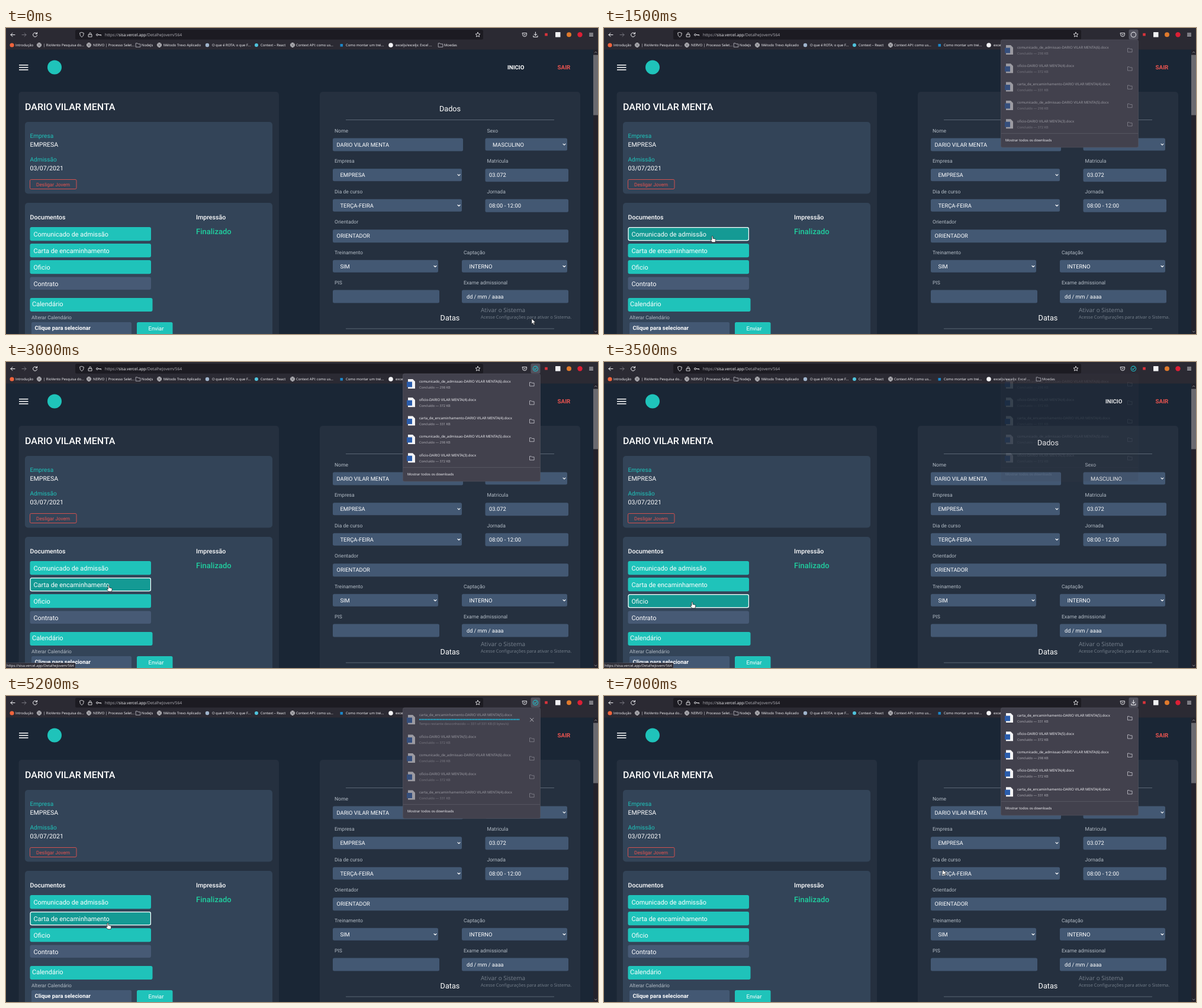
An HTML page that plays this animation: 1000 by 518 pixels, repeating every 7.1 s.

```html
<!DOCTYPE html>
<html lang="pt-BR">
<head>
<meta charset="utf-8">
<title>Detalhe do jovem</title>
<style>
html, body { margin: 0; width: 100%; height: 100%; overflow: hidden; background: #1a2635; }
svg { display: block; width: 100%; height: 100%; text-rendering: geometricPrecision; }
text { font-family: Roboto, sans-serif; white-space: pre; }
.ui { font-family: "Open Sans", "Noto Sans", sans-serif; }
</style>
</head>
<body>
<svg id="stage" viewBox="0 0 1000 518" preserveAspectRatio="none"></svg>
<script>
const LOOP = 7100, STEP = 100;
const PERSON = 'DARIO VILAR MENTA';
const URL_HOST = 'sisa.vercel.app', URL_PATH = '/DetalheJovem/564';
const TEAL = '#1fc3ba', FIELD = '#435873', INNER = '#334458', CARD = '#25303f', RED = '#e5534f';
const CHROME = '#2b2a33', LIGHT = '#fbfbfe';

const rect = (x, y, w, h, fill, r = 0, extra = '') =>
  `<rect x="${x}" y="${y}" width="${w}" height="${h}" rx="${r}" fill="${fill}" ${extra}/>`;
const text = (x, y, str, size, fill = '#fff', extra = '') =>
  `<text x="${x}" y="${y}" font-size="${size}" fill="${fill}" ${extra}>${str}</text>`;
const ui = (x, y, str, size, fill = LIGHT, extra = '') => text(x, y, str, size, fill, 'class="ui" ' + extra);
const dot = (x, y, r, fill) => `<circle cx="${x}" cy="${y}" r="${r}" fill="${fill}"/>`;
const line = (d, color = LIGHT, w = 1, extra = '') =>
  `<path d="${d}" fill="none" stroke="${color}" stroke-width="${w}" stroke-linecap="round" stroke-linejoin="round" ${extra}/>`;
const group = (id, body, extra = '') => `<g id="${id}" ${extra}>${body}</g>`;
const MEDIUM = 'font-weight="500"', BOLD = 'font-weight="700"', MIDDLE = 'text-anchor="middle"';

const folder = (x, y) =>
  line(`M${x - 3.8} ${y + 3}v-6h2.8l1 1.2h3.8v4.8z`, '#dcdce2', 0.7);
const globe = (x, y) =>
  line(`M${x - 3.5} ${y}a3.5 3.5 0 1 0 7 0a3.5 3.5 0 1 0 -7 0h7M${x} ${y - 3.5}q-3 3.5 0 7q3 -3.5 0 -7`, LIGHT, 0.8);

function toolbar() {
  const marks = [
    [10, 16, 'Introdução', dot(10, 29, 3.6, '#f0643c')],
    [56, 63, '| RioVento Pesquisa do...', 'globe'],
    [140, 147, 'NERVO | Processo Selet...', 'globe'],
    [223, 229, 'NodeJs', 'folder'],
    [259, 266, 'Método Trevo Aplicado', 'globe'],
    [340, 348, 'O que é ROTA: o que F...', dot(340, 29, 3.2, '#9fb4cc')],
    [423, 430, 'Context – React', dot(423, 29, 3, '#4fc3dc')],
    [484, 490, 'Context API: como us...', 'globe'],
    [567, 574, 'Como montar um trei...', rect(564.5, 27, 4.5, 4.5, '#1c86c8')],
    [650, 658, 'exceljs/exceljs: Excel ...', dot(650, 29, 3.8, '#f4f4f6')],
    [734, 740, 'Moedas', 'folder']
  ];
  const icons = { globe, folder };
  let s = rect(0, 0, 1000, 36.5, CHROME) + rect(117, 3, 689, 16.5, '#1c1b22', 2.5);
  s += line('M15 11.5H8M11 8.5l-3 3 3 3');
  s += line('M27 11.5h7M31 8.5l3 3-3 3', '#77767f');
  s += line('M52 9.5a3.5 3.5 0 1 0 .5 3M52.5 7.5v2.5h-2.5');
  s += line('M128 7.5l3.4 1.2q0 5 -3.4 6.8q-3.4 -1.8 -3.4 -6.8z', LIGHT, 0.8);
  s += line('M139.5 11h5.5v4h-5.5zM140.7 11v-1.5a1.5 1.5 0 0 1 3 0v1.5', LIGHT, 0.8);
  s += line('M152.5 11.5a1.6 1.6 0 1 0 3.2 0a1.6 1.6 0 1 0 -3.2 0M155.7 11.5h5v1.5M158.7 11.5v1.2', LIGHT, 0.8);
  s += ui(167, 13.7, `https://<tspan fill="${LIGHT}">${URL_HOST}</tspan>${URL_PATH}`, 6.8, '#b4b3ba');
  s += line('M797 7.3l1.2 2.6 2.8.3-2.1 1.9.6 2.8-2.5-1.4-2.5 1.4.6-2.8-2.1-1.9 2.8-.3z', LIGHT, 0.8);
  s += line('M872.5 8.5h7v2.5a3.5 3.5 0 0 1 -7 0zM874.5 10.5l1.5 1.5 1.5-1.5', LIGHT, 0.9);
  s += rect(910.2, 8.8, 4.6, 4.6, '#d8333b') + rect(928, 7, 8.5, 8.5, '#f1f1f3', 0.5);
  s += dot(951, 11.3, 4, '#e07a2c') + dot(969.5, 11.3, 4.2, '#dc1f35');
  s += line('M985.5 9h6M985.5 11.3h6M985.5 13.6h6', LIGHT, 0.9);
  for (const [ix, tx, label, icon] of marks)
    s += (icons[icon] ? icons[icon](ix, 28.8) : icon) + ui(tx, 30.8, label, 5.9);
  return s;
}

function downloadIcon() {
  const ring = 'M890.2 11.3a4.2 4.2 0 1 0 8.4 0a4.2 4.2 0 1 0 -8.4 0';
  return group('iconBg', rect(886.5, 2.5, 16, 17, '#52525e', 2.5)) +
    group('iconArrow', line('M894.4 7v5.5M892 10.3l2.4 2.4 2.4-2.4M890.8 13.2v2h7.2v-2')) +
    group('iconRing', line(ring, '#d9d9df', 1.1)) +
    group('iconCheck', line(ring + 'M892.3 11.4l1.5 1.6 2.7-3.3', '#1fb9c4', 1.1));
}

const docNames = ['Comunicado de admissão', 'Carta de encaminhamento', 'Oficio', 'Contrato'];
const rowY = i => 337 + 28 * i;

function leftCard() {
  let s = rect(21.5, 108, 439.5, 430, CARD, 5) + rect(32, 159, 418, 121.5, INNER, 5) + rect(32, 296, 418, 240, INNER, 5);
  s += text(32, 139, PERSON, 16, '#fff', MEDIUM);
  s += text(40.5, 186, 'Empresa', 10.1, TEAL) + text(40.5, 200.7, 'EMPRESA', 10.6);
  s += text(40.5, 226.3, 'Admissão', 10.1, TEAL) + text(40.5, 240.8, '03/07/2021', 10.6);
  s += rect(40.5, 256.5, 78.5, 16, 'none', 2, `stroke="${RED}" stroke-width=".9"`) + text(51, 267.6, 'Desligar Jovem', 8.3, RED);
  s += text(40.5, 324.3, 'Documentos', 10.6, '#fff', MEDIUM) + text(321, 324.3, 'Impressão', 10.6, '#fff', MEDIUM);
  s += text(321, 349.4, 'Finalizado', 13, '#20cf9f', MEDIUM);
  docNames.forEach((name, i) => {
    const y = rowY(i), last = i === 3;
    s += rect(40.5, last ? 421.5 : y, 204.5, last ? 21.5 : 23.2, last ? '#475a75' : TEAL, 3, `id="doc${i}"`);
    s += text(46.5, y + (last ? 15.6 : 16), name, 10.9);
  });
  s += rect(41.1, 0.6, 203.3, 22, 'none', 2.6, 'id="focus" stroke="#fff" stroke-width="1.2"');
  s += rect(40.5, 457, 207, 23, TEAL, 3) + text(44, 471.3, 'Calendário', 11);
  s += text(43, 493.3, 'Alterar Calendário', 8.5, '#b3bcc6');
  s += rect(43, 498, 169, 24, FIELD, 2.5) + text(48.5, 511.3, 'Clique para selecionar', 9.45, '#fff', BOLD);
  s += rect(221, 498, 60.5, 24, TEAL, 2.5) + text(240.5, 511.8, 'Enviar', 9.5);
  return s;
}

function field(x, y, w, label, value, select) {
  const inset = select ? 12.5 : 6.5;
  return text(x + 3, y - 10, label, 8.55, '#b3bcc6') +
    rect(x, y, w, select ? 21 : 22, FIELD, 2.5) +
    text(x + inset, y + 14, value, 9.4) +
    (select ? line(`M${x + w - 7} ${y + 9.7}l2 2 2-2`, '#fff', 1.1) : '');
}

function rightCard() {
  const rule = y => rect(574, y, 352, 1, '#5a6674');
  let s = rect(530, 108, 440, 430, CARD, 5);
  s += text(750, 141.4, 'Dados', 12.7, '#fff', MIDDLE) + rule(155);
  s += field(552, 186.5, 220, 'Nome', PERSON) + field(809.5, 186.5, 138.5, 'Sexo', 'MASCULINO', true);
  s += field(552, 238.2, 218, 'Empresa', 'EMPRESA', true) + field(809.5, 238.2, 140.5, 'Matricula', '03.072');
  s += field(552, 289.8, 218, 'Dia de curso', 'TERÇA-FEIRA', true) + field(809.5, 289.8, 140.5, 'Jornada', '08:00 - 12:00');
  s += field(552, 341.3, 398, 'Orientador', 'ORIENTADOR');
  s += field(552, 392.8, 178, 'Treinamento', 'SIM', true) + field(770, 392.8, 178, 'Captação', 'INTERNO', true);
  s += field(552, 443.5, 180, 'PIS', '') + field(770, 443.5, 180, 'Exame admissional', '');
  s += text(778, 457.5, 'dd / mm / aaaa', 9.1);
  s += text(750, 494.6, 'Datas', 12.7, '#fff', MIDDLE) + rule(508.5);
  return s;
}

function page() {
  let s = rect(0, 36.5, 1000, 482, '#1a2635');
  s += rect(22, 62, 15.5, 1.5, '#fff') + rect(22, 66, 15.5, 1.5, '#fff') + rect(22, 70, 15.5, 1.5, '#fff');
  s += dot(82, 66.5, 12, TEAL);
  s += text(847, 70, 'INICIO', 9.7, '#fff', BOLD) + text(931.5, 70, 'SAIR', 9.9, RED, BOLD);
  s += leftCard() + rightCard();
  s += ui(802, 481, 'Ativar o Sistema', 10, '#77818d') + ui(802, 491.6, 'Acesse Configurações para ativar o Sistema.', 7.5, '#77818d');
  s += rect(992, 36.5, 8, 482, '#23222b') + rect(992, 45.5, 8, 102, '#6a6a70');
  s += line('M994.5 42l1.7-2 1.7 2M994.5 513l1.7 2 1.7-2', '#8c8c92', 0.9);
  return s;
}

// Download list: [kind, copy number]
const kinds = { c: ['comunicado_de_admissao', 298], o: ['oficio', 372], e: ['carta_de_encaminhamento', 331] };
const firstList = [['c', 6], ['o', 4], ['e', 4], ['c', 5], ['o', 3]];
const secondList = [['e', 5], ['o', 5], ['c', 6], ['o', 4], ['e', 4]];

function panel(id, list, busy) {
  const shift = busy ? 5.3 : 0;
  let rows = '', bar = '';
  list.forEach(([kind, copy], i) => {
    const [name, kb] = kinds[kind], active = busy && i === 0;
    const y = 37 + 31.3 * i + (busy ? (i ? shift : 3) : 0);
    const top = active ? 34.3 : y - 2.5;
    rows += `<path d="M679 ${y - 8}h8l4 4v12h-12z" fill="#f3f3f5"/>` + rect(677, y - 3.5, 9, 9, '#2a5cab');
    rows += ui(698, top, `${name}-${PERSON}(${copy}).docx`, 6);
    if (active) {
      bar = line('M698 39.7H868', '#1fb9dc', 2, 'stroke-dasharray="1.8 .7" style="stroke-linecap:butt"');
      rows += ui(698, 49.3, `Tempo restante desconhecido — ${kb} of ${kb} KB (0 bytes/s)`, 5.6, '#b4b3ba');
      bar += line(`M885.5 ${y - 2.5}l5.5 5.5m0-5.5l-5.5 5.5`, '#c4c3ca', 0.9);
    } else {
      rows += ui(698, y + 7.5, `Concluído — ${kb} KB`, 5.6, '#b4b3ba') + folder(888.3, y + 0.4);
    }
  });
  return group(id, rect(670.5, 20, 232, 182 + shift, '#42414d', 2.5, 'stroke="#52525e" stroke-width=".7"') +
    `<g class="rows">${rows}</g>` + bar + rect(671, 178 + shift, 231, 0.8, '#5b5a66') +
    ui(678, 191.5 + shift, 'Mostrar todos os downloads', 5.9));
}

const status = () => group('status', rect(-1, 509.5, 118, 10, CHROME, 1, 'stroke="#55545f" stroke-width=".7"') +
  ui(1, 516.3, `https://${URL_HOST}${URL_PATH}`, 5.95));

const cursors = () =>
  group('arrow', '<path d="M0 0v9.2l2.1-2 1.5 3.3 1.5-.7-1.5-3.2h2.9z" fill="#fff" stroke="#111" stroke-width=".6"/>') +
  group('hand', '<path d="M-1 .8q1-1.6 2 0v3.4l3.6.8q1.4.4 1.2 1.8l-.8 4H-.2l-3-4q.3-1.4 2.2-.2z" fill="#fff" stroke="#111" stroke-width=".7"/>');

const stage = document.getElementById('stage');
stage.innerHTML = page() + toolbar() + downloadIcon() + status() +
  panel('listA', firstList) + panel('listBusy', secondList, true) + panel('listB', secondList) + cursors();

const byId = id => document.getElementById(id);
const show = (id, on) => byId(id).setAttribute('opacity', +on);

// Cursor tip: [ms, x, y]
const path = [
  [0, 888, 492], [200, 872, 486], [300, 872, 486], [1100, 183, 352], [1900, 183, 352],
  [2200, 182, 368], [2900, 182, 368], [3200, 149, 406], [3700, 149, 406], [4200, 185, 376],
  [4400, 185, 376], [4600, 189, 390], [5000, 172, 384], [5700, 172, 384], [6500, 545, 315],
  [6600, 545, 315], [7000, 572, 294]
];
// Focused button and toolbar icon: [ms, value]
const focusSteps = [[0, -1], [1200, 0], [2300, 1], [3300, 2], [4300, 1], [6700, -1]];
const iconSteps = [[0, 'iconArrow'], [1100, 'iconRing'], [2000, 'iconCheck'], [6000, 'iconArrow']];
const panelSteps = [[0, 0], [1300, 0.5], [1400, 1], [3400, 0.5], [3500, 0.13], [3600, 0], [5000, 0.5], [5100, 1]];

const stepAt = (steps, t) => steps.filter(s => s[0] <= t).pop()[1];

function pointAt(t) {
  const i = path.findIndex(p => p[0] > t);
  if (i < 0) return path[path.length - 1].slice(1);
  const [t0, x0, y0] = path[i - 1], [t1, x1, y1] = path[i];
  const k = (t - t0) / (t1 - t0), e = k * k * (3 - 2 * k);
  return [x0 + (x1 - x0) * e, y0 + (y1 - y0) * e];
}

function draw(t) {
  const [x, y] = pointAt(t);
  const over = x > 40 && x < 245 && [0, 1, 2].some(i => y >= rowY(i) && y <= rowY(i) + 23);
  for (const id of ['arrow', 'hand']) byId(id).setAttribute('transform', `translate(${x} ${y})`);
  show('hand', over);
  show('arrow', !over);

  const focus = stepAt(focusSteps, t);
  for (let i = 0; i < 3; i++) byId('doc' + i).setAttribute('fill', i === focus ? '#149a94' : TEAL);
  byId('focus').setAttribute('transform', `translate(0 ${rowY(focus)})`);
  show('focus', focus >= 0);

  const alpha = stepAt(panelSteps, t), second = t >= 5000, busy = second && t < 5400;
  show('listA', second ? 0 : alpha);
  show('listBusy', busy ? alpha : 0);
  show('listB', second && !busy ? alpha : 0);
  const locked = t < 1900 || (second && t < 5600);
  document.querySelectorAll('.rows').forEach(g => g.setAttribute('opacity', locked ? 0.5 : 1));

  const icon = stepAt(iconSteps, t);
  for (const id of ['iconArrow', 'iconRing', 'iconCheck']) show(id, id === icon);
  show('iconBg', (t >= 1300 && t < 3400) || second);
  show('status', (t >= 900 && t < 1200) || (t >= 2000 && t < 3800));
}

let start = null;
function tick(now) {
  if (start === null) start = now;
  draw(Math.floor(((now - start) % LOOP) / STEP) * STEP);
  requestAnimationFrame(tick);
}
draw(0);
requestAnimationFrame(tick);
</script>
</body>
</html>
```
